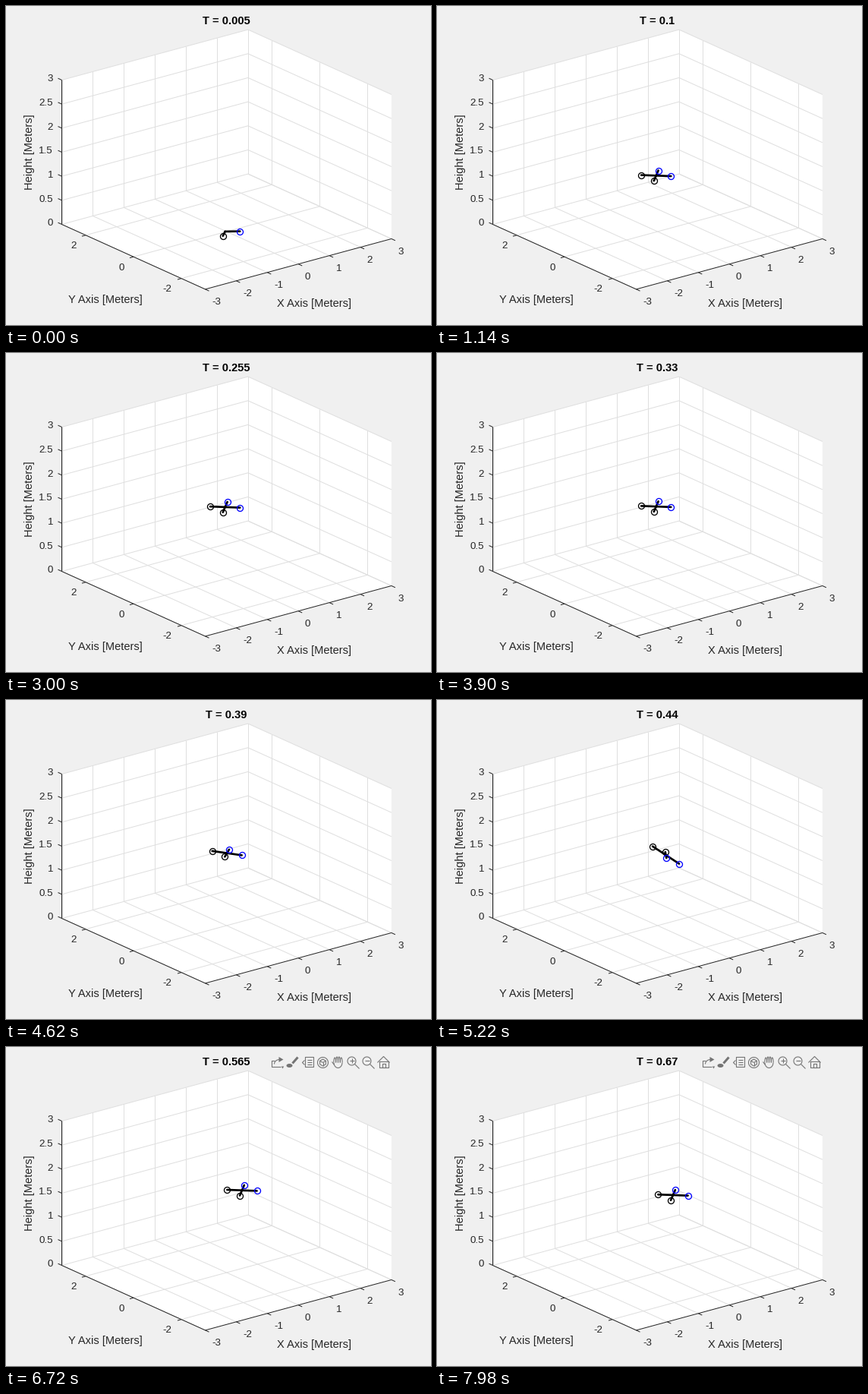
A matplotlib script that plays this animation: 560x420 px, repeating every 8000 ms.

```python
import numpy as np
import matplotlib.pyplot as plt
from matplotlib.animation import FuncAnimation
from matplotlib.collections import LineCollection
from matplotlib.patches import Polygon

W, H, DPI = 560, 420, 100
TICK_MS, HOLD, FRAMES = 20, 3, 400
TOOLBAR_STEP = 105
INK, ICON = "#262626", "#747474"

# floor corners on screen fix the projection; x and y span 6 m, z spans 3 m
LEFT, FRONT, RIGHT = np.array([[73, 287], [262, 372.4], [507.4, 306]])
EX, EY, EZ = (RIGHT - FRONT) / 6, (LEFT - FRONT) / 6, np.array([0, -190 / 3])
ORIGIN = (LEFT + RIGHT) / 2
HOME = ORIGIN - (2, 0.1)
ARM_X, ARM_Y = 0.275, 0.265


def px(n):
    """Pixels to points."""
    return n * 72 / DPI


def project(x, y, z, origin=ORIGIN):
    return origin + x * EX + y * EY + z * EZ


plt.rcParams["font.family"] = "Liberation Sans"
fig = plt.figure(figsize=(W / DPI, H / DPI), dpi=DPI, facecolor="#f0f0f0")
ax = fig.add_axes([0, 0, 1, 1])
ax.set_xlim(-0.5, W - 0.5)
ax.set_ylim(H - 0.5, -0.5)
ax.axis("off")


def label(x, y, s, size=14.67, ha="center", color=INK, **kw):
    return ax.text(x, y, s, fontsize=px(size), va="baseline", ha=ha, color=color, **kw)


def strokes(segs, color, width, **kw):
    col = LineCollection(segs, colors=color, linewidths=px(width), **kw)
    ax.add_collection(col, autolim=False)
    return col


def fill(pts, color, **kw):
    return ax.add_patch(Polygon(pts, fc=color, ec="none", **kw))


def tick(p, step, shift, value, ha):
    strokes([[p, p + step]], INK, 1, zorder=3)
    label(*(p + shift), f"{value:g}", 13.33, ha)


def draw_box():
    rim = [(-3, -3, 0), (3, -3, 0), (3, -3, 3), (3, 3, 3), (-3, 3, 3), (-3, 3, 0)]
    fill([project(*p) for p in rim], "white")

    grid = []

    def line(a, b):
        ends = np.array([project(*a), project(*b)])
        if a[:2] == b[:2]:
            ends[:, 0] = np.floor(ends[:, 0])  # crisp uprights
        grid.append(ends)

    heights = np.arange(0, 3.1, 0.5)
    for x in range(-3, 4):
        line((x, -3, 0), (x, 3, 0))
        line((x, 3, 0), (x, 3, 3))
        tick(project(x, -3, 0), (5, 2.3), (8.8, 20.5), x, "left")
    for y in (-2, 0, 2):
        line((-3, y, 0), (3, y, 0))
        line((3, y, 0), (3, y, 3))
        tick(project(-3, y, 0), (-5, 1.4), (-12.6, 17.7), y, "right")
    for z in heights:
        line((-3, 3, z), (3, 3, z))
        line((3, 3, z), (3, -3, z))
        tick(project(-3, 3, z), (-5, -2.3), (-11.5, 2), z, "right")
    strokes(grid, "#dfdfdf", 1, zorder=2)
    strokes([[LEFT + 3 * EZ, LEFT, FRONT, RIGHT]], INK, 1, zorder=3)

    label(405.4, 396, "X Axis [Meters]")
    label(130.5, 391, "Y Axis [Meters]")
    label(35, 192, "Height [Meters]", rotation=90, rotation_mode="anchor")


def arc(x, y, rx, ry=None, start=0, sweep=360, n=24):
    """Points on an ellipse; a small n gives a regular polygon."""
    a = np.radians(start + np.linspace(0, sweep, n + 1))
    return np.column_stack([x + rx * np.cos(a), y - (ry or rx) * np.sin(a)])


def rect(x, y, w, h):
    return [(x, y), (x + w, y), (x + w, y + h), (x, y + h), (x, y)]


def draw_toolbar():
    """Row of outline icons, 20 pixels apart."""
    share, brush, tip, spin, hand, zoom_in, zoom_out, house = 357 + 20 * np.arange(8)
    cy = 20
    segs = [
        [(share - 4, 18), (share - 8, 18), (share - 8, 26), (share + 4, 26)],
        arc(share + 3, 22, 7, 6, 180, -90),
        rect(tip - 4, 13, 11, 13),
        arc(tip - 4, cy, 3, start=90, sweep=180, n=2),
        arc(spin, cy, 7),
        arc(spin, cy, 4.5, start=90, n=6),
        arc(hand, cy, 5.5, 7, 180, 180),
        [(hand - 5, 23), (hand - 8, 19)],
        arc(house, cy, 8, sweep=180, n=2),
        rect(house - 6, 19, 12, 8),
        rect(house - 2, 22, 4, 5),
    ]
    for k in range(3):
        segs.append([(tip - 1, 17 + 3 * k), (tip + 5, 17 + 3 * k)])
        segs.append([(spin, cy), arc(spin, cy, 4.5, start=30 + 120 * k)[0]])
    for k in range(4):
        segs.append(arc(hand - 4.2 + 2.8 * k, cy, 1.4, 8 - abs(k - 1.5), 0, 180))
    for cx in (zoom_in - 2, zoom_out - 2):
        segs += [arc(cx, 18, 5.5), [(cx + 4, 22), (cx + 10, 28)],
                 [(cx - 3, 18), (cx + 3, 18)]]
    segs.append([(zoom_in - 2, 15), (zoom_in - 2, 21)])

    return [
        strokes(segs, ICON, 1.1, zorder=6),
        strokes([[(brush + 7, 13), (brush, 21)]], ICON, 3, zorder=6),
        fill(arc(brush - 4, 24, 4, 2.5), ICON, zorder=6),
        fill(arc(share + 4, 16, 4, n=3), ICON, zorder=6),
        fill(arc(share + 7, 26, 2, start=-90, n=3), ICON, zorder=6),
    ]


def bump(t, mid, width):
    return np.exp(-((t - mid) / width) ** 2)


def pose(step):
    """Forward position, height, pitch and roll of the craft."""
    t = 0.005 * step
    clock = t + 0.005
    u = np.clip((clock - 0.36) / 0.145, 0, 1)
    x = 0.544 * u * u * (3 - 2 * u)
    # overdamped climb, a dip while tilted, then an overshoot
    z = 1.5 * (1 - 1.52 * np.exp(-20 * t) + 0.52 * np.exp(-58.5 * t))
    z += 0.115 * bump(clock, 0.555, 0.08) - 0.104 * bump(clock, 0.44, 0.03)
    pitch = np.radians(40 * bump(clock, 0.43, 0.03) - 25 * bump(clock, 0.505, 0.025))
    roll = 0.06 * np.exp(-t / 0.02)
    return x, z, pitch, roll


draw_box()
toolbar = draw_toolbar()
title = label(289.6, 24, "", weight="bold", color="black")
arms = strokes([], "black", 2.7, zorder=8, capstyle="round")
rotors = {
    side: ax.plot([], [], "o", ms=px(8), mfc="none", mec=color, mew=px(1.3), zorder=9)[0]
    for side, color in ((-1, "black"), (1, "blue"))
}


def update(frame):
    step = frame // HOLD
    x, z, pitch, roll = pose(step)
    center = project(x, 0, z, HOME)
    segs = []
    for side, dots in rotors.items():
        tips = []
        for wing in (-1, 1):
            dz = -side * ARM_X * np.sin(pitch) - wing * ARM_Y * np.sin(roll)
            # parts under the floor are clipped
            if z + dz < 0:
                continue
            tips.append(project(x + side * ARM_X * np.cos(pitch),
                                wing * ARM_Y * np.cos(roll), z + dz, HOME))
        dots.set_data([p[0] for p in tips], [p[1] for p in tips])
        segs += [[center, p] for p in tips]
    arms.set_segments(segs)
    title.set_text(f"T = {round(0.005 * (step + 1), 3):g}")
    for part in toolbar:
        part.set_visible(step >= TOOLBAR_STEP)
    return [arms, title, *rotors.values(), *toolbar]


anim = FuncAnimation(fig, update, frames=FRAMES, interval=TICK_MS,
                     init_func=lambda: update(0), repeat=True, repeat_delay=0,
                     blit=False)
plt.show()
```
